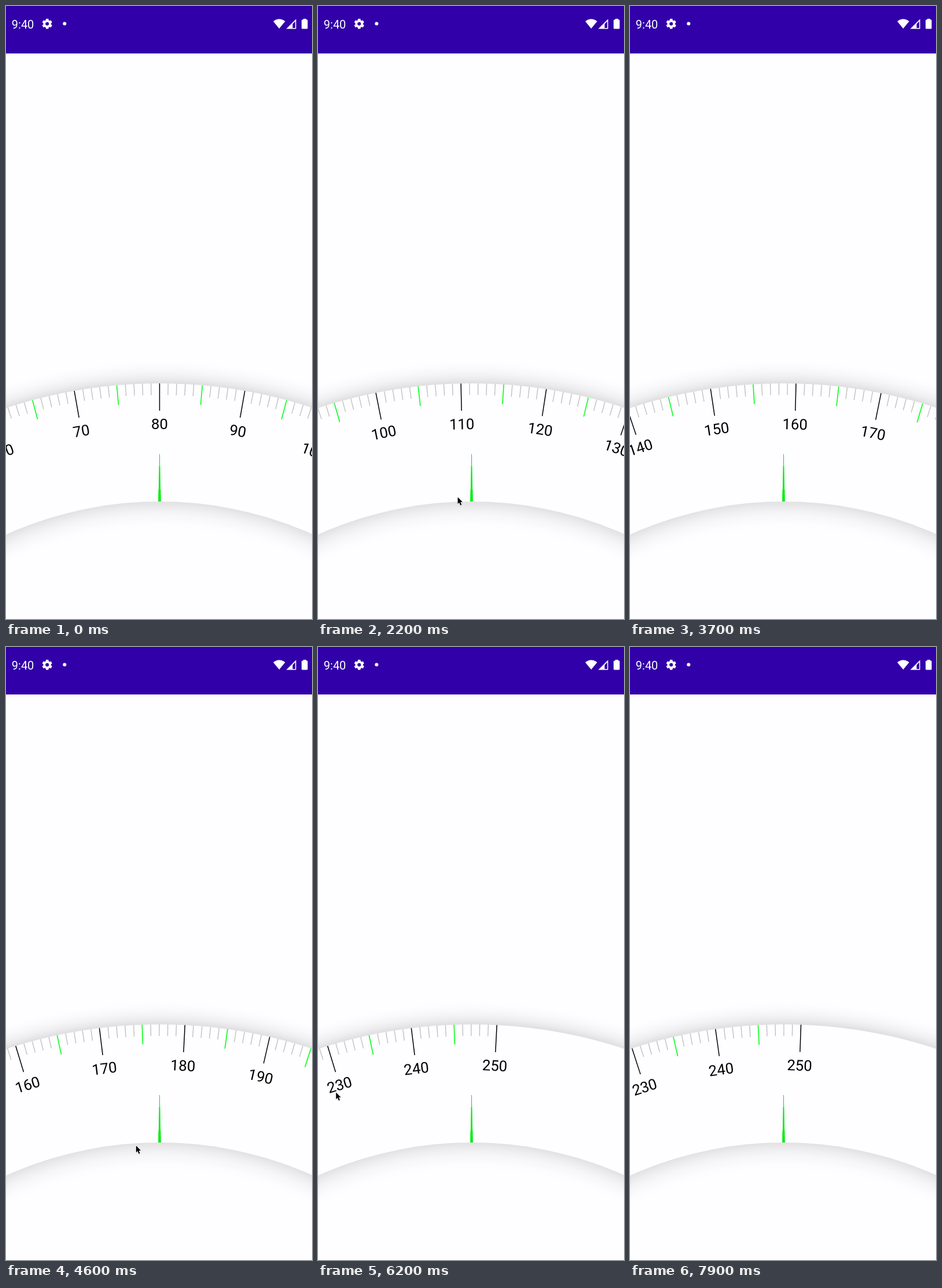
Write an HTML page with a canvas that moves like this. It is 529 px wide and 1059 px high and loops after 8 s.

```html
<!DOCTYPE html>
<html lang="en">
<head>
<meta charset="utf-8">
<title>Dial scale</title>
<style>
html, body { margin: 0; width: 100%; height: 100%; overflow: hidden; background: #fefdff; }
canvas { display: block; width: 529px; height: 1059px; }
</style>
</head>
<body>
<canvas id="stage" width="529" height="1059"></canvas>
<script>
const ctx = document.getElementById('stage').getContext('2d');
const W = 529, H = 1059, LOOP = 8000, STEP = 100;
const CX = 265.5, CY = 1501, OUTER = 849, INNER = 645, LABEL = 779;
const PAPER = '#fefdff', BAR = '#3200a9', GREEN = '#1f2';
const RAD = Math.PI / 180;

// The pointer enters at rest, then drags the dial to a new value in each stroke
const entry = { end: 500, x1: 268, y: 966, value: 80 };
const strokes = [
  { start: 1100, end: 1700, x0: 269, x1: 95, y: 885, value: 98.1 },
  { start: 1900, end: 2900, x0: 374, x1: -69, y: 848, value: 141.9 },
  { start: 3200, end: 3600, x0: 145, x1: -20, y: 880, value: 158.55 },
  { start: 4400, end: 4900, x0: 394, x1: -30, y: 861, value: 204.77 },
  { start: 5100, end: 6224, x0: 521, x1: 20, y: 769, value: 247.97 }
];

const mix = (a, b, p) => a + (b - a) * p;
const ease = p => p < 0.5 ? 4 * p ** 3 : 1 - 4 * (1 - p) ** 3;

// Dial value and pointer place; the pointer glides back between strokes
function pose(t) {
  let last = entry;
  for (const s of strokes) {
    if (t < s.start) {
      const p = ease(Math.max(0, (t - last.end) / (s.start - last.end)));
      return { value: last.value, x: mix(last.x1, s.x0, p), y: mix(last.y, s.y, p), shown: t >= entry.end };
    }
    if (t <= s.end) {
      const p = (t - s.start) / (s.end - s.start);
      return { value: mix(last.value, s.value, p), x: mix(s.x0, s.x1, p), y: s.y, shown: true };
    }
    last = s;
  }
  return { value: last.value, shown: false };
}

function polygon(points, fill) {
  ctx.beginPath();
  points.forEach(([x, y]) => ctx.lineTo(x, y));
  ctx.closePath();
  ctx.fillStyle = fill;
  ctx.fill();
}

function disc(x, y, r, fill) {
  ctx.beginPath();
  ctx.arc(x, y, r, 0, 2 * Math.PI);
  ctx.fillStyle = fill;
  ctx.fill();
}

// Soft shadow that fades from the edge radius to the far radius
function shade(edge, far, strength) {
  const g = ctx.createRadialGradient(CX, CY, Math.min(edge, far), CX, CY, Math.max(edge, far));
  for (let i = 0; i <= 10; i++) {
    const p = i / 10, a = strength * (1 - p) ** 2.7;
    g.addColorStop(edge < far ? p : 1 - p, `rgba(0,0,0,${a.toFixed(4)})`);
  }
  return g;
}

function drawBody() {
  ctx.fillStyle = PAPER;
  ctx.fillRect(0, 0, W, H);
  disc(CX, CY, OUTER + 50, shade(OUTER, OUTER + 50, 0.125));
  disc(CX, CY, OUTER, PAPER);
  disc(CX, CY, INNER, shade(INNER, INNER - 60, 0.115));
}

function drawScale(value) {
  ctx.font = '25.7px Roboto, sans-serif';
  ctx.textAlign = 'center';
  const first = Math.max(0, Math.ceil(value - 26));
  const last = Math.min(250, Math.floor(value + 26));
  for (let n = first; n <= last; n++) {
    const major = n % 10 === 0, middle = n % 5 === 0;
    const length = major ? 47 : middle ? 34 : 20;
    ctx.save();
    ctx.translate(CX, CY);
    ctx.rotate((n - value) * RAD);
    ctx.strokeStyle = major ? '#000' : middle ? GREEN : '#bdbdbd';
    ctx.lineWidth = major ? 1.5 : middle ? 1.7 : 1.3;
    ctx.beginPath();
    ctx.moveTo(0, -OUTER);
    ctx.lineTo(0, length - OUTER);
    ctx.stroke();
    if (major) {
      ctx.fillStyle = '#000';
      ctx.fillText(n, 0, 9.2 - LABEL);
    }
    ctx.restore();
  }
}

function drawNeedle() {
  const part = (top, bottom, a, b) => polygon(
    [[CX - a / 2, top], [CX + a / 2, top], [CX + b / 2, bottom], [CX - b / 2, bottom]], '#06ee14');
  part(774, 795, 1, 1.3);
  part(795, 835, 2, 3.2);
  part(835, 856, 4, 4.8);
}

function drawGear(x, y) {
  ctx.save();
  ctx.translate(x, y);
  for (let i = 0; i < 6; i++) {
    polygon([[-2.9, -5], [-2, -8.7], [2, -8.7], [2.9, -5]], '#fff');
    ctx.rotate(60 * RAD);
  }
  disc(0, 0, 6.6, '#fff');
  disc(0, 0, 3, BAR);
  ctx.restore();
}

function drawStatus() {
  ctx.fillStyle = BAR;
  ctx.fillRect(0, 0, W, 82);
  ctx.fillStyle = '#fff';
  ctx.font = '20px Roboto, sans-serif';
  ctx.textAlign = 'left';
  ctx.fillText('9:40', 9.8, 38.8);
  drawGear(71.2, 30.8);
  disc(101.3, 30.6, 3, '#fff');

  ctx.beginPath();
  ctx.moveTo(472.3, 39);
  ctx.lineTo(462, 26.5);
  ctx.quadraticCurveTo(472.3, 18.5, 482.6, 26.5);
  ctx.closePath();
  ctx.fillStyle = '#fff';
  ctx.fill();

  polygon([[501.5, 22.5], [501.5, 39.5], [484.5, 39.5]], '#fff');
  polygon([[500, 26.5], [500, 38], [495.5, 38], [495.5, 31]], BAR);

  ctx.fillStyle = '#fff';
  ctx.fillRect(514, 22, 5, 3);
  ctx.beginPath();
  ctx.roundRect(511, 23.5, 10.5, 16, 1.5);
  ctx.fill();
}

function drawPointer(x, y) {
  const arrow = [[0.5, 0.5], [0.5, 12.2], [3.1, 9.8], [5.2, 14.6], [7.2, 13.7], [5.2, 9.1], [8.8, 8.9]];
  ctx.save();
  ctx.translate(x, y);
  ctx.shadowColor = 'rgba(0,0,0,0.3)';
  ctx.shadowBlur = 2;
  ctx.shadowOffsetY = 1;
  polygon(arrow, '#000');
  ctx.shadowColor = 'transparent';
  ctx.strokeStyle = '#fff';
  ctx.lineWidth = 1.4;
  ctx.stroke();
  polygon(arrow, '#000');
  ctx.restore();
}

function frame() {
  const t = Math.floor((performance.now() % LOOP) / STEP) * STEP;
  const { value, x, y, shown } = pose(t);
  drawBody();
  drawScale(value);
  drawNeedle();
  drawStatus();
  if (shown) drawPointer(x, y);
  requestAnimationFrame(frame);
}
frame();
</script>
</body>
</html>
```
